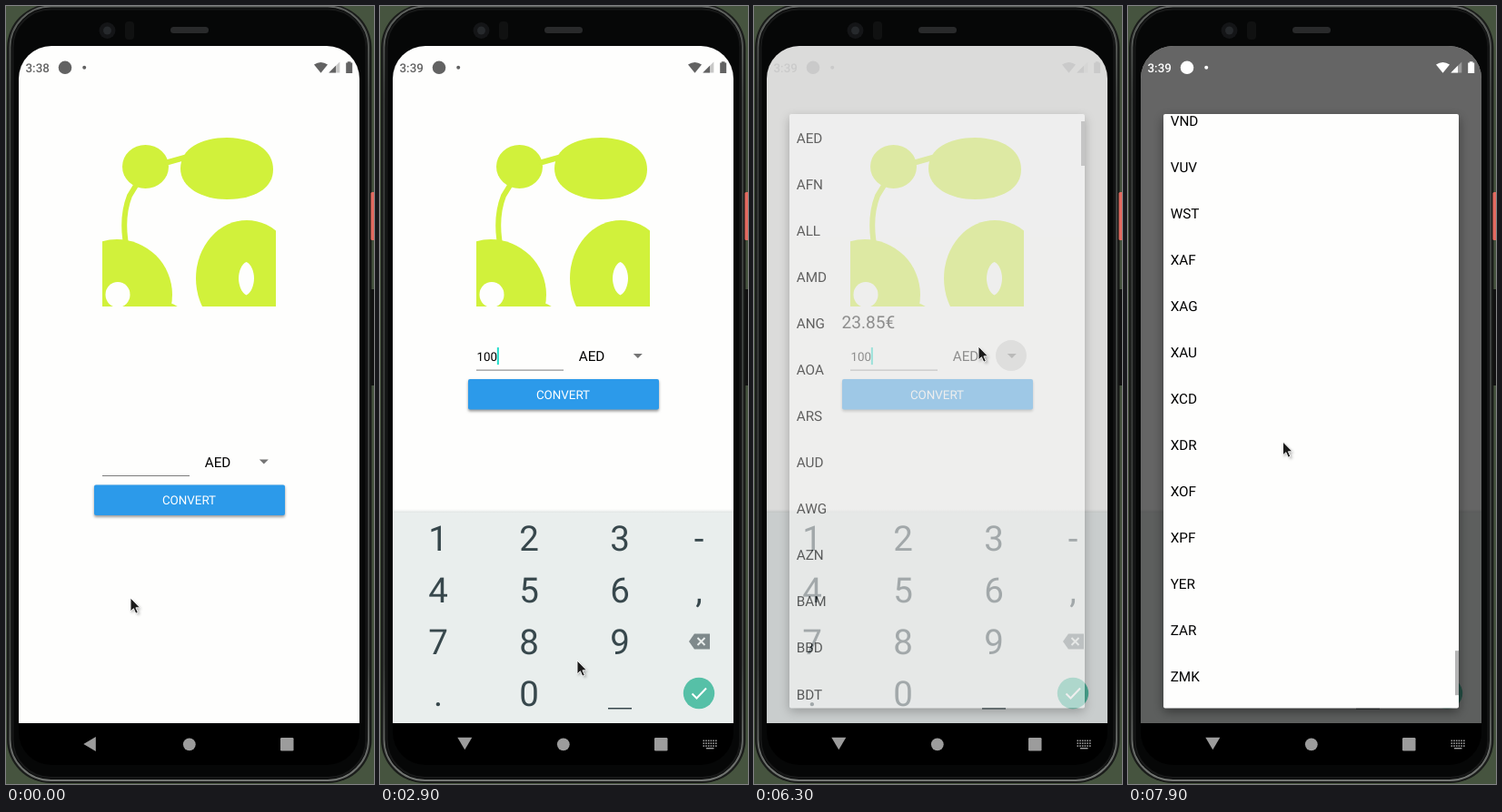
Animation of 405x857 px, one loop 8000 ms. Source, as an HTML page:

```html
<!DOCTYPE html>
<html lang="en">
<head>
<meta charset="utf-8">
<title>Currency converter</title>
<style>
html, body { margin: 0; width: 100%; height: 100%; overflow: hidden; background: #46543f; }
svg { display: block; width: 405px; height: 857px; }
text { font-family: Roboto, sans-serif; text-rendering: geometricPrecision; }
</style>
</head>
<body>
<svg viewBox="0 0 405 857" width="405" height="857">
  <defs>
    <clipPath id="screenClip"><rect x="14" y="44" width="375" height="792" rx="36"/></clipPath>
    <clipPath id="artClip"><rect x="106" y="144" width="191" height="187"/></clipPath>
    <clipPath id="listClip"><rect x="39" y="119" width="325" height="654.500" rx="2"/></clipPath>
    <linearGradient id="rim" x1="0" y1="0" x2="0" y2="1">
      <stop offset="0" stop-color="#606360"/>
      <stop offset=".12" stop-color="#3c3f3d"/>
      <stop offset=".85" stop-color="#3c3f3d"/>
      <stop offset="1" stop-color="#737673"/>
    </linearGradient>
    <linearGradient id="keyEdge" x1="0" y1="0" x2="0" y2="1">
      <stop offset="0" stop-color="#e9eeed" stop-opacity="0"/>
      <stop offset="1" stop-color="#dfe3e2"/>
    </linearGradient>
    <filter id="soft" x="-20%" y="-50%" width="140%" height="200%"><feGaussianBlur stdDeviation="1.5"/></filter>
    <filter id="wide" x="-20%" y="-20%" width="140%" height="140%"><feGaussianBlur stdDeviation="6"/></filter>
  </defs>

  <!-- phone body -->
  <rect width="405" height="857" fill="#46543f"/>
  <rect x="1" y="-2" width="401.500" height="858" rx="48" fill="#1a1c1a"/>
  <rect x="4.500" y="0.500" width="394.500" height="852.500" rx="45" fill="#060707" stroke="url(#rim)" stroke-width="2"/>
  <rect x="7.500" y="3.500" width="389" height="846.500" rx="42" fill="none" stroke="#171818" stroke-width="2"/>
  <rect x="401.500" y="312" width="4" height="106" fill="#111"/>
  <rect x="401.500" y="205" width="6" height="53" rx="1.500" fill="#e2695f"/>
  <circle cx="111.500" cy="27" r="9" fill="#141517"/>
  <circle cx="111.500" cy="27" r="4.500" fill="#26292c"/>
  <rect x="131" y="17" width="10" height="20" rx="4" fill="#101111"/>
  <rect x="181" y="23" width="42" height="7" rx="3.500" fill="#292a2b"/>

  <g clip-path="url(#screenClip)">
    <rect x="14" y="44" width="375" height="746" fill="#fefefd"/>

    <g clip-path="url(#artClip)" fill="#d1f13b">
      <ellipse cx="153.500" cy="177" rx="25.500" ry="24"/>
      <path d="M192 179C192 157 215 145 243 145S294 157 294 180 270 213 243 213 192 200 192 179Z"/>
      <path d="M175 173L200 166M144 196L136 209Q127 232 132 262" fill="none" stroke="#d1f13b" stroke-width="6"/>
      <circle cx="122" cy="318" r="61"/>
      <path d="M180 327Q185 328 190 332H178Z"/>
      <ellipse cx="265" cy="300" rx="56" ry="64"/>
      <ellipse cx="123" cy="318" rx="13.500" ry="14" fill="#fefefd"/>
      <path d="M264.500 282C270 284 273 293 273 300S270 316 264.500 318.500C259 316 256 307 256 300S259 284 264.500 282Z" fill="#fefefd"/>
    </g>

    <text id="result" x="96.500" y="354.700" font-size="19.100">23.85€</text>

    <g id="form">
      <text id="amount" x="106.500" y="507.300" font-size="13.360"></text>
      <rect x="106" y="517" width="96" height="1" fill="#7b7b7b"/>
      <rect id="caret" y="492.500" width="2" height="19" fill="#20dcca"/>
      <text x="218.700" y="507.900" font-size="15.270">AED</text>
      <circle id="ripple" cx="283" cy="501.500" r="17" fill-opacity=".17"/>
      <path d="M278.800 499.500H288.800L283.800 504.500Z" fill="#757575"/>
      <rect x="97" y="529" width="210" height="34" rx="2" fill-opacity=".4" filter="url(#soft)"/>
      <rect x="97" y="527.500" width="210" height="33.500" rx="2" fill="#2c9aea"/>
      <text x="201.500" y="549.200" font-size="13.360" text-anchor="middle" fill="#fff">CONVERT</text>
    </g>

    <rect x="14" y="790" width="375" height="46" fill="#000"/>

    <g id="keys">
      <rect x="14" y="554" width="375" height="4" fill="url(#keyEdge)"/>
      <rect x="14" y="558" width="375" height="232" fill="#e9eeed"/>
      <g id="digits" font-size="38.500" text-anchor="middle" fill="#37474c"></g>
      <rect x="251" y="773" width="26" height="1.500" fill="#37474c"/>
      <path d="M340 700L346 691.500H363V708.500H346Z" fill="#7e898b"/>
      <path d="M349.500 696L357.500 704M357.500 696L349.500 704" stroke="#e9eeed" stroke-width="1.900"/>
      <circle cx="351" cy="757" r="17.200" fill="#56c0a7"/>
      <path d="M343.500 757.500L348.500 762.500 359 751.500" fill="none" stroke="#fff" stroke-width="2"/>
    </g>

    <rect id="dim" x="14" y="44" width="375" height="792"/>

    <g id="status">
      <text id="clock" x="21.500" y="73" font-size="13.360" font-weight="500"></text>
      <circle cx="65" cy="67.800" r="7.300"/>
      <circle cx="86.200" cy="67.800" r="2"/>
      <path d="M339 64.500Q346.500 59.500 354 64.500L346.500 73.800Z"/>
      <path d="M367.300 61.500V73.500H355.300Z" fill-opacity=".35"/>
      <path d="M363 65.800V73.500H355.300Z"/>
      <path d="M375.800 61.300H379.500V62.600H381.200V74H374.200V62.600H375.800Z"/>
    </g>

    <g id="dialog">
      <rect x="39" y="123" width="325" height="654" rx="2" fill-opacity=".45" filter="url(#wide)"/>
      <rect x="39" y="119" width="325" height="654.500" rx="2" fill="#fefefd"/>
      <g clip-path="url(#listClip)">
        <g id="list" font-size="15.270"></g>
        <rect id="thumb" x="360" width="4" height="49" fill="#b4b4b4"/>
      </g>
    </g>

    <g fill="#9c9c9c">
      <path id="back" d="M-8 0L5.500 -8V8Z"/>
      <circle cx="201.800" cy="813.300" r="6.900"/>
      <rect x="302" y="806" width="14.500" height="14.500" rx="1.300"/>
      <g id="imeIcon"></g>
    </g>
  </g>

  <g id="pointer">
    <path d="M1 2V17L5 13 8 19 10.500 18 8 12.500H12Z" fill-opacity=".3" filter="url(#soft)"/>
    <path d="M0 0V14.800L3.400 11.700 5.800 17.200 8.300 16.100 5.900 10.800H10.500Z" fill="#1b1b1b" stroke="#fff" stroke-width=".9"/>
  </g>
</svg>

<script>
const LOOP = 8000, STEP = 100, ROW = 51.05;
const codes = ("AED AFN ALL AMD ANG AOA ARS AUD AWG AZN BAM BBD BDT BGN BHD BIF BMD BND BOB BRL BSD BTC BTN BWP " +
  "BYN BYR BZD CAD CDF CHF CLF CLP CNY COP CRC CUC CUP CVE CZK DJF DKK DOP DZD EGP ERN ETB EUR FJD FKP GBP GEL " +
  "GGP GHS GIP GMD GNF GTQ GYD HKD HNL HRK HTG HUF IDR ILS IMP INR IQD IRR ISK JEP JMD JOD JPY KES KGS KHR KMF " +
  "KPW KRW KWD KYD KZT LAK LBP LKR LRD LSL LTL LVL LYD MAD MDL MGA MKD MMK MNT MOP MRO MUR MVR MWK MXN MYR MZN " +
  "NAD NGN NIO NOK NPR NZD OMR PAB PEN PGK PHP PKR PLN PYG QAR RON RSD RUB RWF SAR SBD SCR SDG SEK SGD SHP SLL " +
  "SOS SRD STD SVC SYP SZL THB TJS TMT TND TOP TRY TTD TWD TZS UAH UGX USD UYU UZS VEF VND VUV WST XAF XAG XAU " +
  "XCD XDR XOF XPF YER ZAR ZMK ZMW ZWL").split(" ");
const maxScroll = codes.length * ROW - 655;
const endScroll = maxScroll - 91.5;

const $ = id => document.getElementById(id);
const set = (id, name, value) => $(id).setAttribute(name, value);
const show = (id, on) => set(id, "visibility", on ? "visible" : "hidden");

function add(parent, tag, attrs, content = "") {
  const el = document.createElementNS("http://www.w3.org/2000/svg", tag);
  for (const k in attrs) el.setAttribute(k, attrs[k]);
  el.textContent = content;
  $(parent).append(el);
}

// Progress of t from a to b, 0..1, and two easings of it.
const ramp = (t, a, b) => Math.min(1, Math.max(0, (t - a) / (b - a)));
const smooth = p => p * p * (3 - 2 * p);
const easeOut = p => 1 - (1 - p) ** 2;

["123-", "456,", "789", ".0"].forEach((row, r) =>
  [...row].forEach((ch, c) => add("digits", "text", { x: c < 3 ? 64 + 100 * c : 351, y: 600 + 57.1 * r }, ch)));
codes.forEach((code, i) => add("list", "text", { x: 46.7, y: 150.9 + ROW * i }, code));
for (let i = 0; i < 18; i++)
  add("imeIcon", "rect", { x: 355.5 + 2.7 * (i % 6), y: 808.5 + 2.9 * Math.floor(i / 6), width: 1.6, height: 1.6 });
add("imeIcon", "rect", { x: 359, y: 817, width: 8.5, height: 1.4 });

// Pointer moves: start, end, then where it goes.
const moves = [
  [300, 700, 140, 500],
  [1050, 1700, 217, 721],
  [3500, 4000, 338, 494],
  [4200, 4700, 191, 431],
  [5300, 5500, 290, 497],
  [5500, 5700, 247, 375],
  [6500, 6900, 186, 457],
  [6900, 7900, 170.5, 480]
];

function pointerAt(t) {
  let x = 137, y = 652;
  for (const [from, to, toX, toY] of moves) {
    const p = smooth(ramp(t, from, to));
    x += (toX - x) * p;
    y += (toY - y) * p;
  }
  return `translate(${x} ${y})`;
}

// The caret blinks every 500 ms; typing restarts it.
function caretOn(t) {
  const since = [2900, 2700, 2100, 1700, 900].find(k => t >= k);
  return since !== undefined && Math.floor((t - since - 1) / 500) % 2 <= 0;
}

function draw(t) {
  const typed = [1700, 2100, 2900].filter(k => t >= k).length;
  $("amount").textContent = "100".slice(0, typed);
  $("clock").textContent = t < 1900 ? "3:38" : "3:39";
  set("caret", "x", 106.2 + 7.55 * typed);
  show("caret", caretOn(t));
  set("form", "transform", `translate(0 ${t < 900 ? 0 : -116.4})`);
  show("result", t >= 5000);
  show("ripple", t >= 6300);

  const slide = t < 1400 ? 282 * Math.exp(-Math.max(0, t - 1000) / 75) : 0;
  set("keys", "transform", `translate(0 ${slide})`);
  show("imeIcon", t >= 1100);
  const turn = ramp(t, 1050, 1400);
  set("back", "transform", `translate(93.300 ${813 - 1.7 * turn}) rotate(${-90 * turn})`);

  const tone = Math.round(98 + 157 * easeOut(ramp(t, 6200, 6440)));
  set("status", "fill", `rgb(${tone},${tone},${tone})`);
  set("dim", "fill-opacity", .6 * ramp(t, 6210, 6600));
  set("dialog", "opacity", easeOut(ramp(t, 6200, 6500)));

  const scroll = endScroll * smooth(ramp(t, 6621.5, 7900));
  set("list", "transform", `translate(0 ${-scroll})`);
  set("thumb", "y", 127 + 590 * scroll / maxScroll);

  set("pointer", "transform", pointerAt(t));
  show("pointer", t < 3500 || t >= 4000);
}

const start = performance.now();
function tick() {
  const t = (performance.now() - start) % LOOP;
  draw(Math.floor(t / STEP) * STEP);
  requestAnimationFrame(tick);
}
draw(0);
requestAnimationFrame(tick);
</script>
</body>
</html>
```
